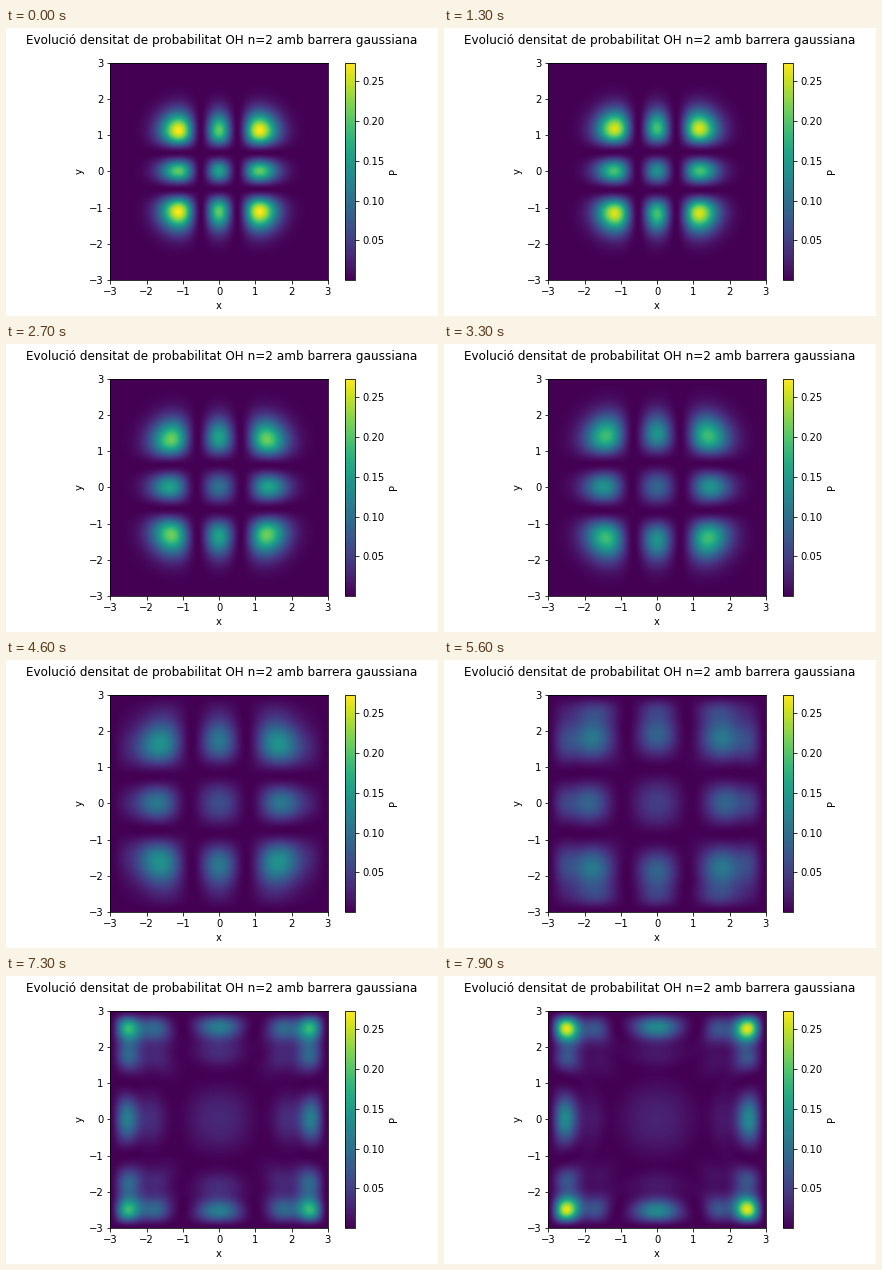
Recreate the animation shown at these times as a matplotlib script. Size 432 by 288 pixels, loop 8 s.

```python
import numpy as np
import matplotlib.pyplot as plt
from matplotlib.animation import FuncAnimation

L, N = 3.0, 120            # half box width, grid cells
OMEGA = 2.0                # oscillator frequency of the starting state
V0, SIGMA = 4.0, 0.8       # gaussian barrier height and width
DT, SUB = 0.01, 4          # time per frame, substeps
FRAMES, INTERVAL = 80, 100

x = np.linspace(-L, L, N + 1)
X, Y = np.meshgrid(x, x)


def second_level(u):
    """Normalised n=2 harmonic oscillator state."""
    s = np.sqrt(OMEGA) * u
    norm = (OMEGA / np.pi) ** 0.25 / np.sqrt(8)
    return norm * (4 * s**2 - 2) * np.exp(-s**2 / 2)


def kinetic_step(tau):
    """Free propagator between hard walls, in the sine basis."""
    k = np.arange(1, N)
    modes = np.sqrt(2 / N) * np.sin(np.pi * np.outer(np.arange(N + 1), k) / N)
    energy = (np.pi * k / (2 * L)) ** 2 / 2
    return (modes * np.exp(-1j * energy * tau)) @ modes.T


def evolve():
    tau = DT / SUB
    kin = kinetic_step(tau)
    half = np.exp(-0.5j * tau * V0 * np.exp(-(X**2 + Y**2) / (2 * SIGMA**2)))
    psi = np.outer(second_level(x), second_level(x)).astype(complex)
    out = []
    for _ in range(FRAMES):
        out.append(np.abs(psi) ** 2)
        for _ in range(SUB):
            psi = half * (kin @ (half * psi) @ kin)
    return out


density = evolve()

plt.rcParams["font.family"] = "DejaVu Sans"
fig, ax = plt.subplots(figsize=(6, 4), dpi=72)
fig.subplots_adjust(left=0.125, right=0.9, bottom=0.125, top=0.88)
fig.suptitle("Evolució densitat de probabilitat OH n=2 amb barrera gaussiana")

edge = L + L / N
image = ax.imshow(density[0], origin="lower", extent=(-edge, edge, -edge, edge),
                  cmap="viridis", vmin=1e-5, vmax=density[0].max(),
                  interpolation="bilinear")
ax.set(xlim=(-L, L), ylim=(-L, L), xlabel="x", ylabel="y",
       xticks=range(-3, 4), yticks=range(-3, 4))
fig.colorbar(image, ax=ax, label="P")


def update(i):
    image.set_data(density[i])
    return (image,)


anim = FuncAnimation(fig, update, frames=FRAMES, interval=INTERVAL,
                     repeat=True, repeat_delay=0)
plt.show()
```
